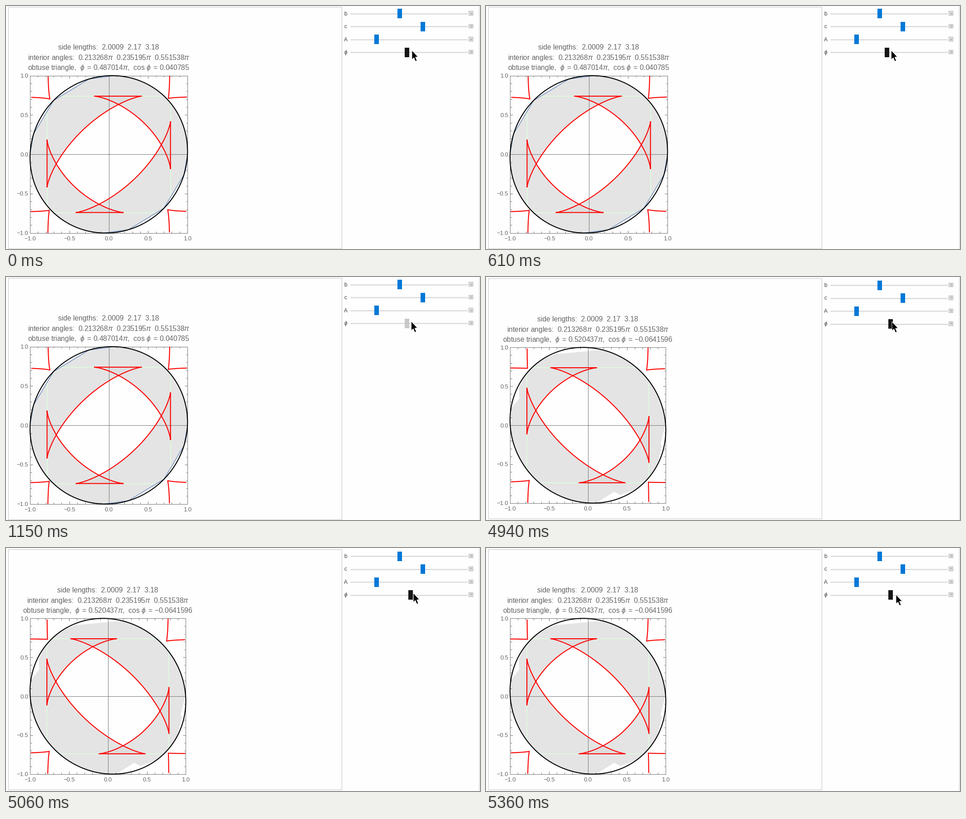
Write a matplotlib script that moves like this. It is 1045 by 536 pixels and loops after 8 s.

```python
import numpy as np
import matplotlib.pyplot as plt
from itertools import count
from matplotlib.animation import FuncAnimation
from matplotlib.collections import LineCollection
from matplotlib.patches import Polygon, Rectangle

W, H, DPI = 1045, 536, 100
LOOP, STEP = 8000, 20
GRAY, FRAME, BLUE, DARK, PALE = "#666666", "#747474", "#0078d7", "#161616", "#c8c8c8"
PAPER, BODY, TAIL = "#fefefe", "#e4e4e4", "#dddddd"

# the triangle: two cosines give the green lines
ANGLES = 0.213268, 0.235195, 0.551538
CA, CB = np.cos(np.pi * np.array(ANGLES[:2]))
SPREAD = 0.307

plt.rcParams.update({
    "font.family": "Liberation Sans",
    "mathtext.fontset": "custom",
    "mathtext.rm": "Liberation Sans",
    "mathtext.it": "Liberation Sans:italic",
    "mathtext.fallback": "stixsans",
})

fig = plt.figure(figsize=(W / DPI, H / DPI), dpi=DPI, facecolor=PAPER)
ax = fig.add_axes([0, 0, 1, 1])
ax.set_xlim(0, W)
ax.set_ylim(H, 0)
ax.axis("off")
layer = count(1)


def px(n):
    return n * 72 / DPI


def minus(s):
    return s.replace("-", "\u2212")


def arc(s):
    """Curve with a 3/2-type cusp at (s, CB) and another at (CA, s)."""
    n = 0.8 - 5 * s
    t = np.linspace(0, 1, 600)
    dx = t**(n + 1) * (1 - t)**(n + 2)
    x, y = np.cumsum(dx), np.cumsum(dx[::-1])
    return np.c_[s + (CA - s) * x / x[-1], CB - (CB - s) * y / y[-1]]


def hook(e, side):
    """Corner branch: dips by e, then closes in on both green lines."""
    d = np.linspace(0, 1, 60)
    near = e / (1 + 6 * d)
    up = np.c_[CA - near, CB - e + d]
    out = np.c_[CA - e + d, CB - near]
    pts = np.r_[up[up[:, 1] <= 1][::-1], out[out[:, 0] <= 1]]
    return pts * (side, 1)


def crossing(a, b):
    d = np.linalg.norm(a[:, None] - b[None], axis=2)
    return np.unravel_index(d.argmin(), d.shape)


class Scene:
    def __init__(self):
        self.parts = []

    def add(self, artist, clip=None):
        artist.set_zorder(next(layer))
        if clip is not None:
            artist.set_clip_path(clip)
        self.parts.append(artist)
        return artist

    def show(self, on):
        for p in self.parts:
            p.set_visible(on)

    def fill(self, pts, color, clip=None):
        return self.add(ax.add_patch(Polygon(pts, facecolor=color, edgecolor="none")), clip)

    def line(self, pts, color, w, closed=False):
        self.add(ax.add_patch(Polygon(pts, closed=closed, fill=False, edgecolor=color,
                                      lw=px(w), joinstyle="round", capstyle="butt")))

    def segments(self, segs, color, w, clip=None):
        self.add(ax.add_collection(LineCollection(segs, colors=color, linewidths=px(w))), clip)

    def text(self, x, y, s, size, ha="center", va="baseline", color=GRAY):
        self.add(ax.text(x, y, s, fontsize=px(size), ha=ha, va=va, color=color))

    def box(self, x, y, w, h, **kw):
        return self.add(ax.add_patch(Rectangle((x - w / 2, y - h / 2), w, h, **kw)))


def draw_plot(s, mid, half, phi, dips, cuts, chords):
    (cx, cy), h = mid, half
    phi *= np.pi

    def at(pts):
        return np.array(mid) + half * np.array(pts) * (1, -1)

    def oval(t):
        return np.c_[np.cos(t), np.cos(t - phi)]

    rim = at(oval(np.linspace(0, 2 * np.pi, 361)))
    clip = s.fill(rim, BODY)

    psi = 3 * phi - np.pi
    q = arc(np.cos(psi + SPREAD))
    p = arc(-np.cos(psi - SPREAD)) * (-1, 1)
    i, j = crossing(p, q)
    m, k = crossing(-p, q)
    inner = np.r_[q[j:k], -p[i:m][::-1]]
    s.fill(at(np.r_[inner, -inner]), PAPER)
    for tail in (np.r_[q[:j + 1], p[:i + 1][::-1]], np.r_[q[k:], -p[m:][::-1]]):
        s.fill(at(tail), TAIL)
        s.fill(at(-tail), TAIL)

    s.segments([at([(g * CA, -1), (g * CA, 1)]) for g in (-1, 1)]
               + [at([(-1, g * CB), (1, g * CB)]) for g in (-1, 1)], "#dff8df", 2, clip)

    # places where the shading stops short of the rim: (degrees, depth)
    for cut in cuts:
        deg, depth = np.array(cut).T
        edge = oval(np.radians(deg))
        inside = edge * depth[:, None]
        s.fill(at(np.r_[inside, 1.3 * edge[::-1]]), PAPER, clip)
        if chords:
            s.line(at(inside), "#5e81b5", 1.3)

    ticks = [at([(-1, 0), (1, 0)]), at([(0, -1), (0, 1)])]
    for n in range(-10, 11):
        v, r = n / 10, 1 - (6 if n % 5 == 0 else 3.5) / h
        for g in (-1, 1):
            ticks += [at([(v, g), (v, g * r)]), at([(g, v), (g * r, v)])]
    s.segments(ticks, FRAME, 1)
    s.line(at([(-1, -1), (1, -1), (1, 1), (-1, 1)]), FRAME, 1, True)
    s.line(rim, "black", 2.1, True)

    s.line(at(np.r_[q, -p[::-1], -q, p[::-1]]), "red", 2.1, True)
    for e, side in zip(dips, (-1, 1)):
        s.line(at(hook(e, side)), "red", 2.1)
        s.line(at(-hook(e, side)), "red", 2.1)

    for v in np.linspace(-1, 1, 5):
        label = minus(f"{v:.1f}")
        s.text(cx - h - 4, cy - v * h, label, 13, "right", "center_baseline")
        s.text(cx + v * h, cy + h + 16, label, 13)


def draw_titles(s, x, y, phi, cosine):
    angles = "  ".join(rf"{a}$\pi$" for a in ANGLES)
    for n, row in enumerate([
            "side lengths:  2.0009  2.17  3.18",
            f"interior angles:  {angles}",
            rf"obtuse triangle,  $\phi\,$ = {phi}$\pi$,  cos $\phi\,$ = {minus(cosine)}"]):
        s.text(x, y + 22.5 * n, row, 15.6)


def draw_panel(s, top, bottom, dy, knob_x):
    s.line([(4.5, top), (740, top), (740, bottom), (4.5, bottom)], "#cfcfcf", 1.3, True)
    s.line([(1042.5, 0), (1042.5, H)], "#d4d4d4", 1.3)
    for n, (name, x) in enumerate([("b", 868), ("c", 919), ("A", 816.5), (r"$\phi$", knob_x)]):
        y = 16.7 + 28.5 * n + dy
        s.text(749, y + 4, name, 12, color="#404040")
        s.segments([[(759, y), (1017, y)]], "#dcdcdc", 2.6)
        knob = s.box(x, y, 10, 21, facecolor=BLUE if n < 3 else DARK, edgecolor="none")
        bx, by = 1024.7, y - 1.2
        s.box(bx, by, 8.6, 8.6, facecolor="#ececec", edgecolor="#b4b4b4", lw=px(1.2))
        s.segments([[(bx - 3, by), (bx + 3, by)], [(bx, by - 3), (bx, by + 3)]], "#a4a4a4", 1.3)
    return knob


before, after = Scene(), Scene()

chain = np.array([(d, 1) for d in (86, 104.5, 134.5, 162.5, 177)])
draw_plot(before, (226.6, 327.2), 173.6, 0.487014, (0.036, 0.028),
          [chain, chain + (180, 0)], True)
draw_titles(before, 226.5, 96, "0.487014", "0.040785")
knob = draw_panel(before, 1.5, 535.3, 0, 883.5)

notches = [
    [(125, 1), (115, 0.98), (81.5, 0.988), (78, 1)],
    [(145, 1), (154, 0.985), (162, 0.927), (171, 0.993), (185, 1)],
    [(330, 1), (336, 0.988), (348, 0.97), (349, 0.95), (363, 0.99)],
    [(276, 1), (292, 0.9), (295.5, 0.965), (305.5, 0.985), (308, 1)],
]
draw_plot(after, (224.7, 327), 171.7, 0.520437, (0.008, 0.031), notches, False)
draw_titles(after, 224.5, 98, "0.520437", "-0.0641596")
draw_panel(after, 2.8, 533.3, 1.3, 892)

ARROW = np.array([(0, 0), (0, 20), (4.3, 16), (7.8, 24), (11, 22.6), (7.6, 14.8), (13.2, 14.2)])
MOVES = [(0, 895, 98), (610, 893.5, 98), (4940, 895, 98.5),
         (5060, 898, 99.5), (5210, 903, 102.5), (5360, 904, 103)]
arrow = ax.add_patch(Polygon(ARROW, facecolor="black", edgecolor="white",
                             lw=px(0.8), zorder=next(layer)))


def update(i):
    t = i * STEP + STEP / 2
    before.show(t < 2740)
    after.show(t >= 2740)
    knob.set_facecolor(DARK if t < 1150 else PALE)
    tip = [m[1:] for m in MOVES if m[0] <= t][-1]
    arrow.set_xy(ARROW + tip)
    return []


update(0)
anim = FuncAnimation(fig, update, frames=LOOP // STEP, interval=STEP,
                     init_func=lambda: [], repeat=True, repeat_delay=0, blit=False)
plt.show()
```
